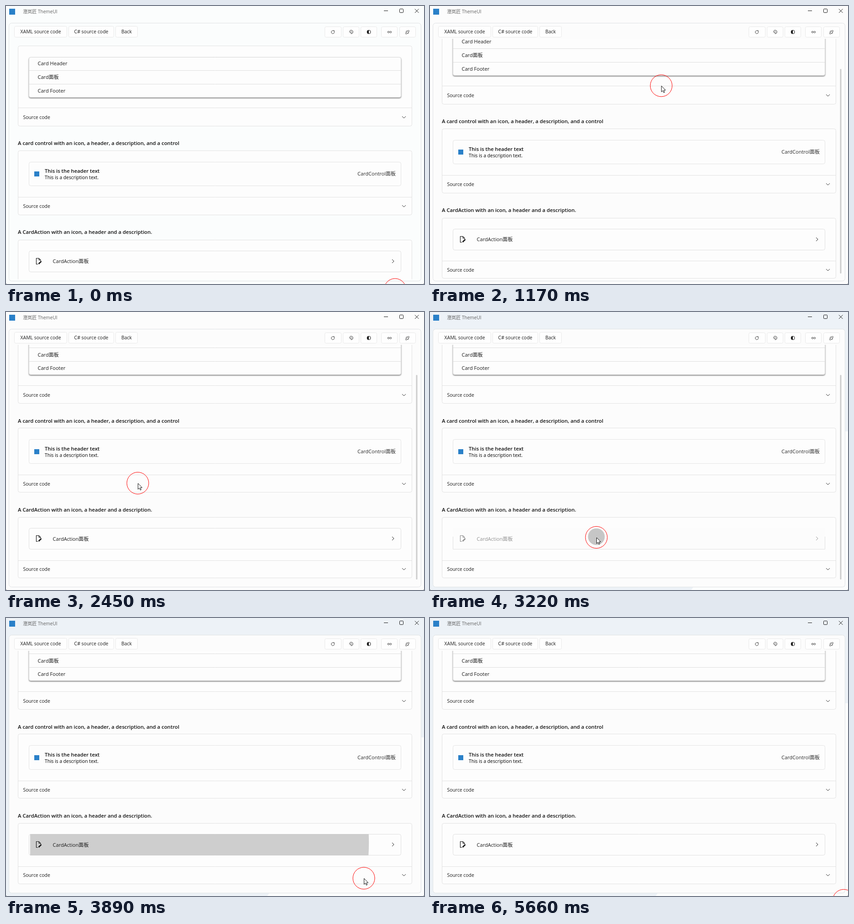
Write an HTML page with a canvas that moves like this. It is 917x610 px and loops after 5.71 s.

```html
<!DOCTYPE html>
<html lang="en">
<head>
<meta charset="utf-8">
<title>Card controls</title>
<style>
html, body { margin: 0; width: 100%; height: 100%; overflow: hidden; background: #fcfcfc; }
canvas { display: block; width: 917px; height: 610px; }
</style>
</head>
<body>
<canvas id="stage" width="917" height="610"></canvas>
<script>
const ctx = document.getElementById('stage').getContext('2d');
const LOOP = 5710;
const FONT = '"Open Sans", "Noto Sans", "Noto Sans CJK SC", "Noto Sans CJK", sans-serif';
const INK = '#1b1b1b', LINE = '#e2e2e2', BLUE = '#2a80c8';
const HEADING = { weight: 600, color: '#111' };
const CLICK = 3191, CLICK_X = 365, CLICK_Y = 493;

// Bursts of screen updates: start, end, steps
const BURSTS = [
  [50, 610, 11], [660, 960, 7], [1120, 1680, 12], [1740, 2290, 11], [2340, 2910, 12],
  [2960, 3530, 12], [3580, 4140, 12], [4190, 4600, 9], [4860, 5360, 11], [5660, 5660, 1]
];
const ticks = [0];
for (const [a, b, n] of BURSTS)
  for (let i = 0; i < n; i++)
    ticks.push(n > 1 ? Math.round((a + (b - a) * i / (n - 1)) / 10) * 10 : a);

// Pointer path: time, x, y
const PATH = [
  [0, 853.5, 622], [610, 648, 240.5], [710, 616.5, 227], [960, 526, 169.5],
  [1140, 526, 169.5], [1630, 219.5, 257], [1680, 217, 276.5], [2290, 262, 333],
  [2860, 365, 494.5], [3380, 365, 494.5], [3890, 785, 571], [4300, 860, 567],
  [4600, 874.5, 564.5], [4810, 874.5, 564.5], [5110, 852, 594], [5360, 907.5, 619.5], [LOOP, 907.5, 619.5]
];

const clamp = v => Math.max(0, Math.min(1, v));
const mix = (a, b, k) => a + (b - a) * k;

function pointerAt(t) {
  let i = 0;
  while (i < PATH.length - 2 && t >= PATH[i + 1][0]) i++;
  const [t0, x0, y0] = PATH[i], [t1, x1, y1] = PATH[i + 1];
  const k = clamp((t - t0) / (t1 - t0));
  return { x: mix(x0, x1, k), y: mix(y0, y1, k) };
}

function text(s, x, y, size, opt = {}) {
  ctx.font = `${opt.weight || 400} ${size}px ${FONT}`;
  ctx.textAlign = opt.align || 'left';
  ctx.fillStyle = opt.color || INK;
  ctx.fillText(s, x, y);
}

function box(x, y, w, h, r, fill, stroke) {
  ctx.beginPath();
  ctx.roundRect(x, y, w, h, r);
  if (fill) { ctx.fillStyle = fill; ctx.fill(); }
  if (stroke) { ctx.lineWidth = 1; ctx.strokeStyle = stroke; ctx.stroke(); }
}

function lines(points, color = INK, width = 1) {
  ctx.beginPath();
  points.forEach(([x, y], i) => i ? ctx.lineTo(x, y) : ctx.moveTo(x, y));
  ctx.strokeStyle = color;
  ctx.lineWidth = width;
  ctx.stroke();
}

function ring(x, y, r, color = INK, from = 0, to = Math.PI * 2) {
  ctx.beginPath();
  ctx.arc(x, y, r, from, to);
  ctx.strokeStyle = color;
  ctx.lineWidth = 1;
  ctx.stroke();
}

function disc(x, y, r, color, from = 0, to = Math.PI * 2) {
  ctx.beginPath();
  ctx.arc(x, y, r, from, to);
  ctx.fillStyle = color;
  ctx.fill();
}

function square(x, y, size) {
  ctx.fillStyle = BLUE;
  ctx.fillRect(x, y, size, size);
}

function drawWindow(t) {
  const k = clamp((t - 3060) / 150);
  const base = t < 50 ? '#fbfdfd' : '#fcfcfc';
  ctx.fillStyle = base;
  ctx.fillRect(0, 0, 917, 610);
  if (k > 0) {
    ctx.globalAlpha = k;
    ctx.fillStyle = '#edf2f7';
    ctx.fillRect(0, 0, 917, 610);
    ctx.globalAlpha = 1;
    const late = t >= 5200;
    const left = late ? 495 : 573, top = late ? 187 : 262;
    ctx.fillStyle = '#fcfdfd';
    ctx.beginPath();
    ctx.moveTo(left, 610);
    ctx.lineTo(left + 5, 603);
    ctx.lineTo(910, 603);
    ctx.lineTo(910, top);
    ctx.lineTo(917, top);
    ctx.lineTo(917, 610);
    ctx.fill();
  }
  ctx.fillStyle = '#555';
  ctx.fillRect(0, 609, 1, 1);
  ctx.fillRect(916, 609, 1, 1);
  box(6.5, 37.5, 904, 566, 6, base, '#dfe2e4');

  square(7, 6, 13);
  text('澄岚匠 ThemeUI', 37, 16, 10.1, { color: '#626262' });
  lines([[829, 10.5], [838, 10.5]]);
  box(863.5, 6.5, 8, 8, 1, null, INK);
  lines([[897, 6.5], [905.5, 15]]);
  lines([[905.5, 6.5], [897, 15]]);
}

function drawToolbar() {
  const buttons = [
    [18, 115, 'XAML source code'], [137, 99, 'C# source code'], [240, 48, 'Back'],
    [699, 36], [739, 35], [778, 35], [823, 35], [863, 35]
  ];
  for (const [x, w, label] of buttons) {
    const y = label ? 44.5 : 45.5;
    box(x + .5, y, w, 68.5 - y, 3, '#fefefe', '#e9e9e9');
    if (label) text(label, x + .5 + w / 2, 60, 10.45, { align: 'center' });
  }
  const dark = '#444';
  ring(717, 57.3, 3.4, dark, -.7, 5.1);
  lines([[717.7, 53.8], [720, 53.8], [720, 56]], dark);

  // Palette
  ring(757.3, 57, 3.9, dark, -2.8, 1.7);
  lines([[753.6, 55.7], [754, 57.5], [756.5, 57.5], [757, 60.8]], dark);
  for (const [x, y] of [[756.5, 55.2], [758.8, 56], [759, 58.4]]) disc(x, y, .7, dark);

  ring(796, 57, 4, INK);
  disc(796, 57, 4, INK, Math.PI / 2, Math.PI * 1.5);

  ring(839, 57.2, 1.8, dark);
  ring(843.8, 57.2, 1.8, dark);

  box(876.5, 58.5, 3, 3, 1, null, dark);
  box(881.5, 53.5, 3, 3, 1, null, dark);
  lines([[878, 58], [878, 55], [881, 55]], dark);
  lines([[880, 60], [883, 60], [883, 57]], dark);
}

function drawContent(t, mouse) {
  const scroll = t < 1120 ? 0 : t < 1220 ? 48 : 62.5;
  const at = y => Math.floor(y - scroll);
  const over = (a, b) => mouse.x > 51 && mouse.x < 866 && mouse.y > at(a) && mouse.y < at(b);
  const shade = on => on ? '#fafafa' : '#fdfdfd';

  const row = y => lines([[51, at(y) + .5], [866, at(y) + .5]], '#dedede');
  const frame = (x, w, top, bottom, fill, color) =>
    box(x, at(top) + .5, w, at(bottom) - at(top), 4, fill, color);

  const group = (top, split, bottom, label) => {
    frame(26.5, 864, top, bottom, '#fdfdfd', LINE);
    lines([[27, at(split) + .5], [890, at(split) + .5]], LINE);
    text('Source code', 37.5, at(label), 10.4);
    const y = at(label) - 4;
    lines([[869, y - 2], [873, y + 2], [877, y - 2]], '#333');
  };

  ctx.save();
  ctx.beginPath();
  ctx.rect(7, 72, 903, 527.5);
  ctx.clip();

  group(87.2, 223.7, 263.2, 248.5);
  ctx.save();
  ctx.shadowColor = 'rgba(0,0,0,.65)';
  ctx.shadowBlur = 3;
  ctx.shadowOffsetY = 1.5;
  frame(50.5, 816, 112.2, 200.2, '#fdfdfd');
  ctx.restore();
  frame(50.5, 816, 112.2, 200.2, '#fdfdfd', '#d8d8d8');
  row(141.2);
  row(171.2);
  text('Card Header', 69.5, at(130.5), 11.05);
  text('Card面板', 69.5, at(160.5), 11.05);
  text('Card Footer', 69.5, at(190.2), 11.05);

  text('A card control with an icon, a header, a description, and a control', 26, at(305.5), 11.31, HEADING);
  group(317.2, 419.7, 458.2, 443.5);
  frame(50.5, 816, 342.2, 394.7, shade(over(342, 395)), '#e4e4e4');
  square(62, at(363.5), 11);
  text('This is the header text', 85, at(366.5), 11.25, HEADING);
  text('This is a description text.', 85, at(380.5), 10.3, { color: '#000' });
  text('CardControl面板', 855, at(372.5), 11, { align: 'right', color: '#2a2a2a' });

  text('A CardAction with an icon, a header and a description.', 26, at(500.5), 11.31, HEADING);
  group(513.2, 607.7, 645.7, 631);
  drawAction(t, at, shade(over(537, 583)));
  ctx.restore();

  // The thumb hides when idle and returns as the pointer nears it
  const thumb = (t >= 1120 && t < 3480) || (t >= 4300 && t < 5110);
  if (thumb) box(899.5, 138, 3, 449, 1.5, '#cdcdcd');
}

function drawAction(t, at, fill) {
  const pressed = t >= 3150 && t < 3380;
  const top = at(537.2), bottom = at(583.2);
  if (pressed) {
    box(51, top, 815, bottom - top, 4, '#fcfcfc');
    lines([[50.5, top + 19], [50.5, bottom + .5], [866.5, bottom + .5], [866.5, top + 19]], '#e0e0e0');
  } else {
    box(50.5, top + .5, 816, bottom - top, 4, fill, '#e0e0e0');
  }

  const age = t - CLICK;
  if (age > 0 && t < 4300) {
    ctx.save();
    ctx.beginPath();
    ctx.rect(53, top + .5, 812, bottom - top);
    ctx.clip();
    ctx.globalAlpha = (.217 - age * .00004) * (1 - clamp((t - 4010) / 290));
    disc(CLICK_X, CLICK_Y, age * .616 + .5, '#000');
    ctx.restore();
  }

  const y = top + 23;
  const ink = pressed ? '#929292' : INK;
  lines([[70, y + 6.5], [66.5, y + 6.5], [66.5, y - 6.5], [72, y - 6.5], [76, y - 2.5], [76, y - 1]], ink, 1.2);
  lines([[72, y - 6.5], [72, y - 2.5], [76, y - 2.5]], ink);
  lines([[71.5, y + 6], [77.5, y]], ink, 2.6);
  text('CardAction面板', 102.5, at(564.5), 11.1, { color: ink });
  lines([[847, y - 4], [851, y], [847, y + 4]], ink);
}

function drawPointer({ x, y }) {
  ring(x, y, 24, '#f00');
  const shape = [[0, 0], [0, 13], [3, 10.3], [5, 14.8], [7, 14], [5.1, 9.6], [9, 9.3]];
  ctx.beginPath();
  for (const [dx, dy] of shape) ctx.lineTo(x + .5 + dx, y + .5 + dy);
  ctx.closePath();
  ctx.fillStyle = '#fff';
  ctx.fill();
  ctx.strokeStyle = '#111';
  ctx.lineWidth = 1;
  ctx.stroke();
}

function draw(now) {
  const t = ticks.findLast(v => v <= now);
  const mouse = pointerAt(t);
  drawWindow(t);
  drawToolbar();
  drawContent(t, mouse);
  drawPointer(mouse);
}

const start = performance.now();
function loop() {
  draw((performance.now() - start) % LOOP);
  requestAnimationFrame(loop);
}
loop();
</script>
</body>
</html>
```
